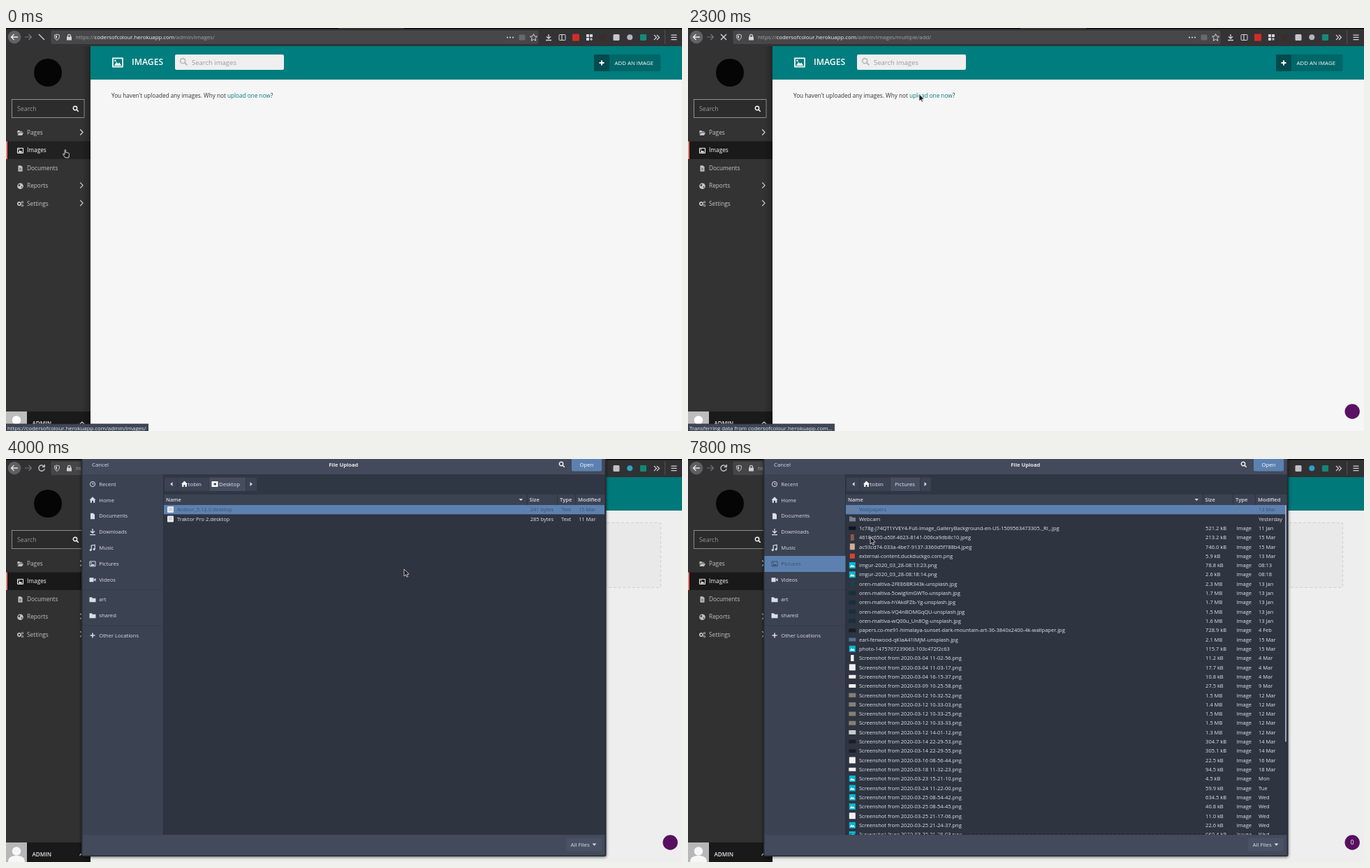
Animation of 968x578 px, one loop 8000 ms. Source, as an HTML page:

```html
<!DOCTYPE html>
<html lang="en">
<head>
<meta charset="utf-8">
<title>Uploading images</title>
<style>
html, body { margin: 0; width: 100%; height: 100%; overflow: hidden; background: #f6f6f6; }
svg { display: block; width: 968px; height: 578px; font-family: "Open Sans", "Noto Sans", sans-serif; }
text { white-space: pre; }
#dialog { filter: drop-shadow(0 1px 2px rgba(0,0,0,.6)); }
</style>
</head>
<body>
<svg id="stage" viewBox="0 0 968 578" xmlns="http://www.w3.org/2000/svg"></svg>
<script>
const HOST = 'codersofcolour.herokuapp.com';
const TEAL = '#007d7e', PALE = '#d8dee9', BLUE = '#5c81b1', FADED = '#3f506c';

const rect = (x, y, w, h, fill, more = '') =>
  `<rect x="${x}" y="${y}" width="${w}" height="${h}" fill="${fill}" ${more}/>`;
const disc = (x, y, r, fill, more = '') => `<circle cx="${x}" cy="${y}" r="${r}" fill="${fill}" ${more}/>`;
const text = (x, y, size, fill, str, more = '') =>
  `<text x="${x}" y="${y}" font-size="${size}" fill="${fill}" ${more}>${str}</text>`;
const line = (d, stroke, width = 1.2, more = '') =>
  `<path d="${d}" fill="none" stroke="${stroke}" stroke-width="${width}" ${more}/>`;
const shape = (d, fill, more = '') => `<path d="${d}" fill="${fill}" ${more}/>`;
const group = (id, ...parts) => `<g id="${id}">${parts.join('')}</g>`;
const at = (x, y, body) => `<g transform="translate(${x} ${y})">${body}</g>`;
const semi = 'font-weight="600"', middle = 'text-anchor="middle"';

// Small icons, drawn around their centre
const icon = {
  folder: c => shape('M-4.5-3.5h3.5l1 1.5h4.5v5.5h-9z', c),
  openFolder: c => shape('M-4-3.5h3l1 1.2h3v1.3h-5.5l-1.5 3z', c) + shape('M-2-.3h6.5l-2 3.8h-6.5z', c),
  picture: c => line('M-4-3.5h8v7h-8z', c, 1) + shape('M-3 2.5l2-3 1.3 1.5 1-1 1.7 2.5z', c) + disc(-2, -1.5, .8, c),
  page: c => shape('M-3-4h4l2 2v6.5h-6z', c),
  docLines: c => icon.page(c) + line('M-1.5 0h3M-1.5 2h3', '#333', .7),
  globe: c => disc(0, 0, 4.3, c) + shape('M-2-3l2 1-1 2-2 0zM1 0l2 1-1 2z', '#333'),
  cogs: c => disc(-1.5, 0, 2.2, 'none', `stroke="${c}" stroke-width="1.7"`) +
    disc(3, -2.3, 1.2, 'none', `stroke="${c}"`) + disc(3, 2.5, 1.2, 'none', `stroke="${c}"`),
  lens: c => disc(-1, -1, 2.7, 'none', `stroke="${c}" stroke-width="1.4"`) + line('M1 1l2.7 2.7', c, 1.6),
  clock: c => disc(0, 0, 3.6, 'none', `stroke="${c}"`) + line('M0-2v2.2h1.8', c, .9),
  home: c => shape('M0-4.5l4.5 4.5h-1.2v4h-2.2v-3h-2.2v3h-2.2v-4h-1.2z', c),
  download: c => line('M0-4.5v6M-3-1.3l3 3 3-3M-4 4h8', c, 1.3),
  music: c => line('M-1.8 3v-6.5l5-.8v6', c, 1.2) + disc(-2.8, 3, 1.5, c) + disc(2.1, 2, 1.5, c),
  video: c => rect(-4.5, -3, 6, 6, c) + shape('M1.5 0l3-2.5v5z', c),
  plus: c => line('M-3.5 0h7M0-3.5v7', c, 1.5),
  desktop: c => rect(-4.5, -4, 9, 8, c) + rect(-1.5, -1.5, 3.5, 3, '#434c5e'),
};

const plusButton = (id, x, y, w, h, left, fill, label) => group(id,
  rect(x, y, w, h, fill, 'rx="2" class="face"'), rect(x, y, 22, h, left, 'rx="1.5"'),
  at(x + 11, y + h / 2, line('M-3.5 0h7M0-3.5v7', '#fff', 2)),
  text(x + 29.5, y + h / 2 + 2.9, 7.85, '#fff', label));

function toolbar() {
  const c = '#d6d6d8';
  return rect(0, 0, 968, 26, '#333335') + rect(0, 0, 968, 1.3, '#050505') + rect(476, 0, 94, 1, '#38383d') +
    disc(12, 13, 9.3, '#626264') + line('M17 13H7.5M11.5 9l-4 4 4 4', '#eee', 1.3) +
    line('M27 13h9M32.5 9l4 4-4 4', '#77777a', 1.2) +
    rect(64.5, 3.5, 698, 19.5, '#474749', 'rx="2"') +
    group('slash', line('M47 9l8 8', c)) + group('stop', line('M47 9l8 8M55 9l-8 8', c, 1.4)) +
    group('reload', line('M54.2 10.2a4.2 4.2 0 1 0 1 3.6M55.3 8v3.3h-3.6', c, 1.3)) +
    line('M73 9l3.5 1.2c0 4-1 6-3.5 7.2-2.5-1.2-3.5-3.2-3.5-7.2z', c, 1) + shape('M73 10.5v5c-1.4-1-2-2.4-2-4.3z', c) +
    rect(87, 12.5, 7, 5, c) + line('M88.5 13v-1.6a2 2 0 0 1 4 0V13', c, 1.2) +
    `<text x="100" y="16.3" font-size="7.8" fill="#a6a6aa">https://<tspan fill="#f4f4f5">${HOST}</tspan><tspan id="urlPath"></tspan></text>` +
    [718, 722, 726].map(x => disc(x, 13.5, 1.1, c)).join('') +
    rect(734.5, 9.5, 9, 8, '#69696c', 'rx="1.5"') +
    line('M755.5 8.5l1.5 3.3 3.5.4-2.6 2.4.8 3.6-3.2-1.8-3.2 1.8.8-3.6-2.6-2.4 3.5-.4z', c, 1) +
    at(777, 13.5, icon.download(c)) + rect(792, 9.5, 9, 8, 'none', `rx="1" stroke="${c}"`) + line('M796 9.5v8', c) +
    rect(811, 8.5, 10, 10, '#d32d27', 'rx="1"') +
    [[831, 9], [836, 9], [831, 14]].map(p => rect(...p, 4, 4, c)).join('') + at(838, 16, line('M-2 0h4M0-2v4', c)) +
    rect(850, 9, 9, 9, '#3d2c27', 'rx="1"') + rect(869.5, 9, 9, 9, '#c7c7ca', 'rx="1.5"') +
    disc(893.3, 13.3, 4, '#b4b4b8', 'id="devIcon"') + rect(908, 9, 9, 9, '#138b78', 'rx="1"') +
    line('M928 10l3.5 3.5-3.5 3.5M932 10l3.5 3.5-3.5 3.5', c, 1.2) + line('M943.7 3v20', '#55555a', 1) +
    line('M952.5 10.2h8M952.5 13.4h8M952.5 16.6h8', c, 1.3);
}

function sidebar() {
  const items = [['Pages', 'openFolder', 1], ['Images', 'picture'], ['Documents', 'docLines'], ['Reports', 'globe', 1], ['Settings', 'cogs', 1]];
  const menu = items.map(([label, name, more], i) => {
    const y = 150 + i * 25.4, c = i === 1 ? '#fff' : '#c6c6c6';
    return at(20.5, y + .5, icon[name](c)) + text(30, y + 3, 8.3, c, label) +
      (more ? line(`M106.3 ${y - 4.5}l3.8 4-3.8 4`, '#ddd', 1.1) : '');
  }).join('');
  return rect(0, 26, 121, 552, '#333') + rect(0, 162.5, 121, 25.5, '#1a1a1a', 'id="activeRow"') +
    rect(0, 162.5, 2, 25.5, '#f37e77') + disc(60, 64, 20, '#050505') +
    rect(8.5, 102.5, 103.5, 26, '#2c2c2c', 'stroke="#aaa" stroke-width=".8"') +
    text(16, 119, 8.8, '#999', 'Search') + at(100, 116, icon.lens('#fff')) + menu +
    rect(0, 550, 121, 28, '#1a1a1a') + rect(0, 550, 30, 28, '#bdbdbd') +
    disc(15, 562.5, 6.2, '#fff') + shape('M3 578c0-7 5-9 12-9s12 2 12 9z', '#fff') +
    text(37.5, 569.5, 8.1, '#f2f2f2', 'ADMIN', semi) + line('M105.5 568.5l3.5-3.5 3.5 3.5', '#ddd', 1.2) +
    rect(108, 26, 13, 552, 'url(#edge)');
}

const pageHeader = title => rect(121, 26, 847, 48, TEAL) +
  `<g transform="translate(160 49.5) scale(1.75)">${icon.picture('#fff')}</g>` + text(180, 53.3, 12.2, '#fff', title, semi);

const imagesPage = () => group('imagesPage', pageHeader('IMAGES'),
  rect(242, 38, 156, 22, '#efefef', 'rx="2"'),
  `<g transform="translate(254.5 48.5) scale(1.3)">${icon.lens('#bbb')}</g>`,
  text(266, 52.6, 9.5, '#999', 'Search images'),
  plusButton('addButton', 842, 38, 95.5, 24, '#004b4d', '#006668', 'ADD AN IMAGE'),
  text(151, 100, 8.2, '#333', `You haven't uploaded any images. Why not <tspan fill="${TEAL}">upload one now</tspan>?`));

const addPage = () => group('addPage', pageHeader('ADD IMAGES'),
  rect(151.5, 91.3, 786, 93, '#f1f1f1', 'rx="2" stroke="#d9d9d9" stroke-width="1.3" stroke-dasharray="4 2.8"'),
  text(544.4, 112.7, 8.2, '#333', 'Drag and drop images into this area to upload immediately.', middle),
  text(544.4, 133.2, 8.2, '#333', 'Supported formats: GIF, JPEG, PNG, WEBP. Maximum filesize: 10.0 MB.', middle),
  plusButton('chooseButton', 456, 145, 176, 23.5, '#005c5e', TEAL, 'OR CHOOSE FROM YOUR COMPUTER'));

const desktopFiles = ['Ardour_5.12.0.desktop|241 bytes|15 Mar', 'Traktor Pro 2.desktop|285 bytes|11 Mar'];
const shots = `03-04 11-02-56|11.2 kB|4 Mar
03-04 11-03-17|17.7 kB|4 Mar
03-04 16-15-37|10.8 kB|4 Mar
03-09 10-25-58|27.5 kB|9 Mar
03-12 10-32-52|1.5 MB|12 Mar
03-12 10-33-03|1.4 MB|12 Mar
03-12 10-33-25|1.5 MB|12 Mar
03-12 10-33-33|1.5 MB|12 Mar
03-12 14-01-12|1.3 MB|12 Mar
03-14 22-29-53|304.7 kB|14 Mar
03-14 22-29-55|305.1 kB|14 Mar
03-16 08-56-44|22.5 kB|16 Mar
03-18 11-32-23|94.5 kB|18 Mar
03-23 15-21-10|4.5 kB|Mon
03-24 11-22-00|59.9 kB|Tue
03-25 08-54-42|634.5 kB|Wed
03-25 08-54-45|40.8 kB|Wed
03-25 21-17-06|11.0 kB|Wed
03-25 21-24-37|22.6 kB|Wed
03-25 21-29-03|660.4 kB|Wed`.split('\n').map(s => 'Screenshot from 2020-' + s.replace('|', '.png|'));
const pictureFiles = `Wallpapers||13 Mar
Webcam||Yesterday
1c78g-J74QT1YVEY4-Full-Image_GalleryBackground-en-US-1509563473305._RI_.jpg|521.2 kB|11 Jan
4618c650-a50f-4623-8141-006ca9db8c10.jpeg|213.2 kB|15 Mar
ac93cd74-033a-4be7-9137-3360d5f788b4.jpeg|746.0 kB|15 Mar
external-content.duckduckgo.com.png|5.9 kB|13 Mar
imgur-2020_03_28-08:13:23.png|78.8 kB|08:13
imgur-2020_03_28-08:18:14.png|2.6 kB|08:18
oren-maltiva-2FEE6BR343k-unsplash.jpg|2.3 MB|13 Jan
oren-maltiva-5cwigXmGWTo-unsplash.jpg|1.7 MB|13 Jan
oren-maltiva-hYAkdFZb-Yg-unsplash.jpg|1.7 MB|13 Jan
oren-maltiva-VQ4nBOMGqQU-unsplash.jpg|1.5 MB|13 Jan
oren-maltiva-wQ00u_Un8Og-unsplash.jpg|1.6 MB|13 Jan
papers.co-me91-himalaya-sunset-dark-mountain-art-36-3840x2400-4k-wallpaper.jpg|728.9 kB|4 Feb
earl-fenwood-qKIaA41lMjM-unsplash.jpg|2.1 MB|15 Mar
photo-1475767239063-103c472f2c63|115.7 kB|15 Mar`.split('\n').concat(shots);

// Thumbnail looks: colour, width, height
const looks = {
  k: ['#12161c', 10, 5], o: ['#8a5a48', 5, 9], b: ['#cfae98', 7, 9], r: ['#d8452f', 7, 7],
  t: ['#1b4250', 5, 9], d: ['#17303a', 10, 6], p: ['#191c22', 10, 5], u: ['#4f7397', 10, 5],
  n: ['#f0f0f0', 4.5, 9], q: ['#f0f0f0', 9, 9], w: ['#f0f0f0', 10, 5], g: ['#857f74', 10, 6],
  h: ['#c9c9c9', 10, 6], z: ['#1a1d24', 10, 5], c: ['#00b8d4', 9, 9],
};
const thumbKinds = 'ffkobrcctddddpucnqwwgggghzzqwccccqcc';
const rowY = i => 72.6 + i * 13.31;

function thumb(kind, i) {
  if (kind === 'f') return at(235.5, rowY(i), icon.folder(i ? '#77808f' : '#6c7f99'));
  const [fill, w, h] = looks[kind];
  return at(235.3, rowY(i), rect(-w / 2, -h / 2, w, h, fill, 'rx=".5"') +
    (kind === 'c' ? shape('M-3.5 2.5l2.3-3.5 1.6 2 1.2-1.2 2 2.7z', '#fff') : ''));
}

function fileTable(files, type, [size, kind, date], inset) {
  const heads = [[229, 'Name'], [size, 'Size'], [kind, 'Type'], [date, 'Modified']];
  return heads.map(([x, s]) => text(x, 61, 7.6, PALE, s, semi)).join('') +
    [size, kind, date].map(x => rect(x - 3.7, 51, .8, 15, '#2a303b')).join('') +
    shape(`M${size - 15} 57h5.5l-2.7 3z`, PALE) + rect(226, 66, 631, 13.3, BLUE) +
    files.map((file, i) => {
      const [name, bytes, when] = file.split('|'), y = rowY(i) + 2.7, c = i ? '#e3e7ee' : FADED;
      return text(245, y, 7.5, c, name) + text(size + inset, y, 7.5, c, bytes) +
        (bytes ? text(kind + inset + .8, y, 7.5, c, type) : '') + text(date + 1, y, 7.5, c, when);
    }).join('');
}

const crumbs = (name, x, tail, withIcon) =>
  rect(227, 26.5, tail + 8 - 227, 19.5, '#3b4252', 'rx="2"') +
  rect(x - 7, 26.5, tail - x - 1, 19.5, '#454d5f') + rect(245, 26.5, .7, 19.5, '#2e3440') +
  rect(x - 7, 26.5, .7, 19.5, '#2e3440') + rect(tail - 8, 26.5, .7, 19.5, '#2e3440') +
  shape('M238.5 33v6l-3.3-3z', PALE) + shape(`M${tail - 1.5} 33v6l3.3-3z`, PALE) +
  at(255.5, 36, icon.home('#fff')) + text(260.5, 38.8, 8, '#e5e9f0', 'tobin') +
  (withIcon ? at(299, 36, icon.desktop('#fff')) : '') + text(withIcon ? 305 : x, 38.8, 7.8, '#e5e9f0', name);

const places = [['Recent', 'clock', 36], ['Home', 'home', 58.8], ['Documents', 'page', 81.7], ['Downloads', 'download', 104.6],
  ['Music', 'music', 127.5], ['Pictures', 'picture', 150.4], ['Videos', 'video', 173.3],
  ['art', 'folder', 201.7], ['shared', 'folder', 224.7], ['Other Locations', 'plus', 253]];
const place = ([label, name, y], c) => at(124, y, icon[name](c)) + text(133.3, y + 2.7, 7.65, c, label);

function dialog() {
  const file = y => rect(231, y - 4.5, 9, 9, '#e6e8ec', 'rx="1"') + line(`M233 ${y - 1.5}h5M233 ${y + .7}h5`, '#aaa', .7);
  return group('dialog',
    rect(108, -4, 751.5, 574, '#272c36', 'rx="2"'), rect(109.5, -4, 748, 26, '#434a5b'),
    rect(109.5, 22, 116, 517, '#3b4252'), rect(226, 22, 631.5, 29, '#303744'),
    rect(226, 51, 631.5, 15, '#3b4252'), rect(226, 66, 631.5, 473, '#2e3440'), rect(225.3, 22, .8, 517, '#2a303b'),
    text(123, 10.8, 7.75, PALE, 'Cancel'), text(483.3, 10.8, 7.6, '#e5e9f0', 'File Upload', middle + ' font-weight="700"'),
    at(796, 8, icon.lens('#eee')), rect(810, -4, 43, 21.5, BLUE, 'rx="2"'), text(831.5, 10.8, 7.8, '#fff', 'Open', middle),
    rect(109.5, 93, 116, 23, '#454c5d', 'id="hover"'),
    places.map(p => place(p, PALE)).join(''), rect(110, 187, 115, .8, '#343a48'), rect(110, 238.5, 115, .8, '#343a48'),
    group('chosen', rect(109.5, 139, 116, 23, BLUE), place(places[5], FADED)),
    group('desktopList', crumbs('Desktop', 297, 351, true),
      fileTable(desktopFiles, 'Text', [749.5, 793, 819], 1.2), file(72.6), file(86)),
    group('pictureList', crumbs('Pictures', 296, 340, false),
      fileTable(pictureFiles, 'Image', [740.5, 784, 816], .6), thumb('f', 0),
      group('thumbs', [...thumbKinds].map(thumb).join('')),
      line('M226 538h631', '#1f242d', 1, 'stroke-dasharray="3 3"')),
    rect(855, 66.5, 2, 339, '#9aa3b3', 'id="scrollbar"'),
    rect(109.5, 539, 748, 29.5, '#434a5b'), rect(802, 543.5, 51, 19, '#495164', 'rx="2"'),
    text(808.5, 555.7, 7.9, PALE, 'All Files'), shape('M839.5 551.5h6l-3 3.3z', PALE));
}

const stage = document.getElementById('stage');
stage.innerHTML = `<defs><linearGradient id="edge"><stop stop-color="#000" stop-opacity="0"/>
  <stop offset="1" stop-color="#000" stop-opacity=".25"/></linearGradient></defs>` +
  rect(0, 0, 968, 578, '#f6f6f6') + toolbar() + group('sidebar', sidebar()) + imagesPage() + addPage() +
  group('badge', disc(951.2, 550, 10.7, '#5a1063'), text(951.2, 553.3, 9, '#fff', '0', middle + ' id="count"')) +
  group('status', rect(0, 568, 204, 11, '#3f4757', 'id="statusBox" stroke="#2b313c" stroke-width=".8"'),
    text(2, 576.8, 7.8, '#e8ebf0', '', 'id="statusText"')) +
  rect(0, 0, 968, 578, '#000', 'id="dim" opacity=".03"') + dialog() +
  group('cursor',
    shape('M0 0V10L2.4 7.9 3.9 11.2 5.5 10.5 4.1 7.3 7.2 7Z', '#1c1c1c', 'id="arrow" stroke="#fff" stroke-width=".7"'),
    shape('M-1-4.5c0-1.2 1.6-1.2 1.6 0v3l4 .8c1 .3 1 1 .9 2l-.6 4.7h-5l-3.2-4.4c-.6-1 .5-1.6 1.2-.9l1.1 1z', '#1c1c1c',
      'id="hand" stroke="#fff" stroke-width=".8"'));

const el = {};
stage.querySelectorAll('[id]').forEach(e => el[e.id] = e);
const show = (id, on) => el[id].style.display = on ? '' : 'none';

// Time, x, y: gliding while the page is browsed, then jumping from stop to stop
const track = [[0, 85, 180], [100, 85, 180], [700, 304, 133], [1500, 331, 95], [2300, 331, 95], [2500, 527, 156],
  [3300, 571, 163], [4000, 570, 158], [4400, 351, 124], [4600, 207, 100], [4800, 183.5, 92.5], [5000, 184, 92],
  [5500, 196, 81], [5700, 205, 109], [5900, 194, 124], [6100, 182, 155], [6300, 181, 149], [6400, 179, 143],
  [7000, 234, 168], [7200, 254, 104], [7400, 257, 100], [7800, 261, 112]];
const hovers = [[4600, 3], [5500, 2], [5700, 3], [5900, 4], [6100, 5]];
const lastBefore = (list, t) => list.filter(k => k[0] <= t).pop();

function pointer(t) {
  const a = lastBefore(track, t), b = track[track.indexOf(a) + 1];
  if (a[0] >= 2500) return [a[1], a[2]];
  const k = (Math.floor(t / 100) * 100 - a[0]) / (b[0] - a[0]);
  return [a[1] + (b[1] - a[1]) * k, a[2] + (b[2] - a[2]) * k];
}

function statusAt(t) {
  const link = `https://${HOST}/admin/images/`;
  if (t < 200) return link;
  if (t < 1000 || (t >= 2000 && t < 3100)) return `Transferring data from ${HOST}…`;
  return t >= 1500 && t < 2000 ? link + 'multiple/add/' : '';
}

let shownStatus = null;
function render(t) {
  const within = (a, b) => t >= a && t < b;
  const blank = within(500, 900) || within(2500, 3100);
  const loading = within(200, 1000) || within(2000, 3100);
  show('sidebar', !blank);
  show('imagesPage', !blank && t < 2500);
  show('addPage', t >= 3100);
  show('badge', t >= 600);
  show('count', t >= 4200);
  show('slash', t < 200);
  show('stop', loading);
  show('reload', t >= 200 && !loading);
  el.reload.setAttribute('opacity', within(1000, 1200) || within(3100, 3300) ? .35 : 1);
  el.devIcon.setAttribute('fill', within(1200, 2000) || t >= 3100 ? '#29a9cf' : '#b4b4b8');
  el.urlPath.textContent = t < 2000 ? '/admin/images/' : '/admin/images/multiple/add/';
  el.activeRow.setAttribute('fill', t < 300 ? '#212121' : '#1a1a1a');
  el.chooseButton.querySelector('.face').setAttribute('fill', within(3300, 4000) ? '#00686a' : TEAL);

  const status = statusAt(t);
  show('status', status);
  if (status && status !== shownStatus) {
    el.statusText.textContent = status;
    el.statusBox.setAttribute('width', el.statusText.getComputedTextLength() + 5);
    shownStatus = status;
  }

  show('dim', t >= 3700);
  show('dialog', t >= 4000);
  show('desktopList', t < 6600);
  show('pictureList', t >= 6600);
  show('thumbs', t >= 6800);
  show('scrollbar', t >= 7200);
  show('chosen', t >= 6300);
  const hover = lastBefore(hovers, t);
  show('hover', hover && t < 6300);
  if (hover) el.hover.setAttribute('y', places[hover[1]][2] - 11.5);

  const [x, y] = pointer(t), hand = t < 300 || within(1500, 2000) || within(3300, 3700);
  show('hand', hand);
  show('arrow', !hand);
  el.cursor.setAttribute('transform', `translate(${x} ${y})`);
}

const start = performance.now();
function tick() {
  render((performance.now() - start) % 8000);
  requestAnimationFrame(tick);
}
tick();
</script>
</body>
</html>
```
